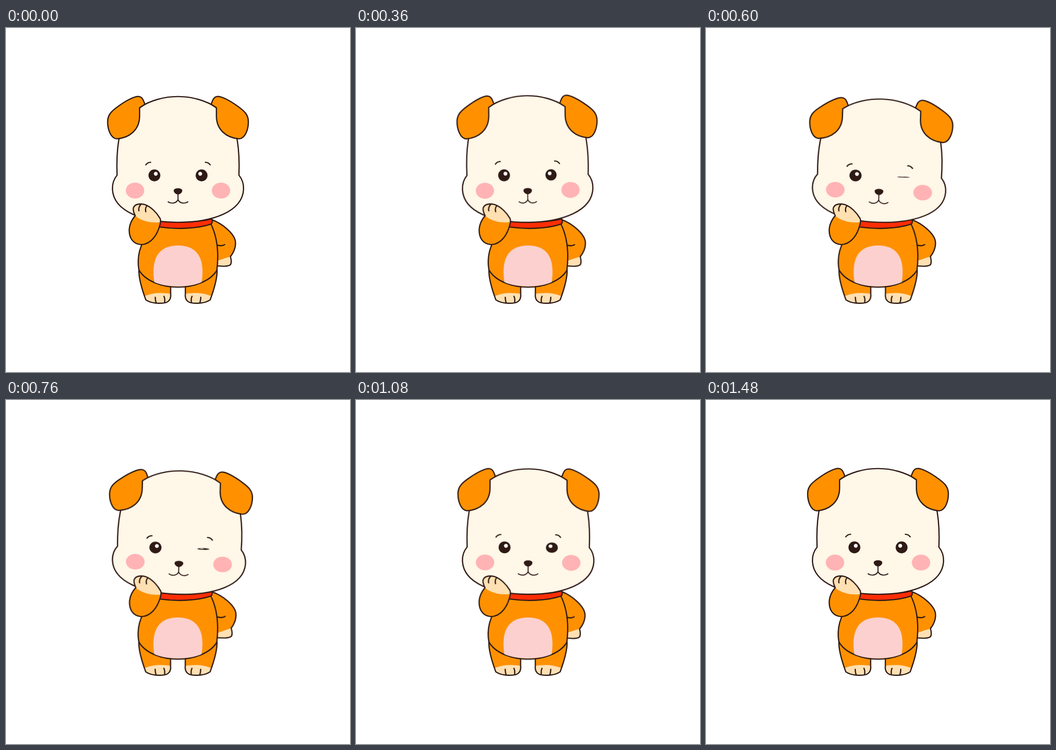
Write an HTML page without scripts that moves like this. It is 748 px wide and 748 px high and loops after 1520 ms.

```html
<!DOCTYPE html>
<html lang="en">
<head>
<meta charset="utf-8">
<title>Winking puppy</title>
<style>
  html, body { margin: 0; width: 100%; height: 100%; overflow: hidden; background: #fff; }
  svg { display: block; width: 100%; height: 100%; }

  .line { fill: none; stroke: #2f1a15; stroke-width: 2.7; stroke-linecap: round; stroke-linejoin: round; }
  .orange { fill: #ff9100; }
  .cream { fill: #fff7e8; }
  .red { fill: #ff2d05; }
  .tip { fill: #ffe0b2; }
  .belly { fill: #fcd0ce; }
  .blush { fill: #ffb3b4; }
  .dark { fill: #2f1a15; }
  .shine { fill: #fff; }

  .move { animation: 1520ms ease-in-out infinite; }
  .head { animation-name: tilt; transform-origin: 374px 419px; }
  .brows { animation-name: brows; }
  .wink { animation-name: wink; transform-origin: 425px 320.5px; }
  .mouth { animation-name: mouth; transform-origin: 374px 374px; }
  .body { animation-name: sway; }
  .paw { animation-name: paw; transform-origin: 293px 470px; }
  .arm { animation-name: arm; transform-origin: 450px 420px; }

  @keyframes tilt {
    0%, 81.6%, 100% { transform: rotate(0deg) scale(1, 1); }
    18.4% { transform: rotate(-.9deg) scale(.992, 1.01); }
    40.8%, 42.1% { transform: rotate(1.95deg) scale(1.017, .98); }
  }
  @keyframes brows {
    0%, 81.6%, 100% { transform: translateY(0); }
    18.4% { transform: translateY(-2px); }
    40.8%, 42.1% { transform: translateY(3px); }
  }
  @keyframes wink {
    0%, 81.6%, 100% { transform: scale(1, 1); }
    18.4% { transform: scale(.94, 1.06); }
    40.8%, 42.1% { transform: scale(1, .07); }
  }
  @keyframes mouth {
    0%, 81.6%, 100% { transform: scaleX(1); }
    13.2%, 23.7% { transform: scaleX(.885); }
    39.5% { transform: scaleX(.93); }
    63.2% { transform: scaleX(.98); }
  }
  @keyframes sway {
    0%, 100% { transform: translateX(0); }
    14.5%, 80% { transform: translateX(-1px); }
    31.6% { transform: translateX(.8px); }
    47.4% { transform: translateX(-.3px); }
    63.2% { transform: translateX(.6px); }
  }
  @keyframes paw {
    0%, 100% { transform: rotate(0deg); }
    14.5%, 47.4%, 80% { transform: rotate(1.4deg); }
    31.6% { transform: rotate(-1.5deg); }
    63.2% { transform: rotate(-2deg); }
  }
  @keyframes arm {
    0%, 100% { transform: rotate(0deg); }
    14.5%, 47.4%, 80% { transform: rotate(-1.5deg); }
    31.6% { transform: rotate(1.7deg); }
    63.2% { transform: rotate(3.7deg); }
  }
</style>
</head>
<body>
<svg viewBox="0 0 748 748">
  <defs>
    <g id="leg">
      <path class="orange" d="M289 525C288 545 297 572 304 591L358 585V545Z"/>
      <path class="tip" d="M301 583C320 575 340 575 358 578C359 587 356 594 348 597C335 600 315 599 304 591Z"/>
      <path class="line" d="M289 525C288 545 297 572 304 591C315 599 335 600 348 597C356 594 359 587 358 578V555M324.500 585.500Q324.500 592 326.500 597.500M343.500 583.500Q346 589 345 595.500"/>
    </g>
    <path id="ear" class="line orange" style="fill:#ff9100" d="M446 166C449 158 451 150 459 149C468 148 486 157 505 171C519 181 527 189 527 204C527 219 521 240 507 241C480 239 457 222 457.500 190L457.500 173.500Z"/>
    <path id="brow" class="line" d="M304 297.500Q308 292 314.500 292"/>
    <ellipse id="blush" class="blush" cx="280.500" cy="353.500" rx="20" ry="17.200"/>
    <g id="eye">
      <circle class="dark" cx="322.700" cy="320.500" r="12.900"/>
      <circle class="shine" cx="325.700" cy="317" r="4.200"/>
    </g>
  </defs>

  <g class="move arm">
    <path class="orange" d="M448 417C470 425 497 447 499 465C500 478 494 490 488 497L450 510Z"/>
    <path class="tip" d="M450 510Q472 505 488 497C490 504 490 510 489 513C487 519 472 519 450 516Z"/>
    <path class="line" d="M448 417C470 425 497 447 499 465C500 478 494 490 488 497C490 504 490 510 489 513C487 519 472 519 450 516M457 471.500Q469 475.500 475.500 471"/>
  </g>

  <g class="move body">
    <use href="#leg"/>
    <use href="#leg" transform="matrix(-1 0 0 1 748 0)"/>
    <path class="line" style="fill:#ff9100" d="M335 425C305 440 287 480 287.500 508C287.500 516 288 522 289.500 527C304 551 340 563.500 374 563.500C408 563.500 444 551 458.500 527C463 490 460 455 445 425Z"/>
    <path class="belly" d="M322.500 552.500C317 515 322 473 374 473C426 473 431 515 425.500 552.500C400 565 348 565 322.500 552.500Z"/>
    <path class="line" style="fill:#ff2d05" d="M330 418C370 425 420 422 447 415Q450 419 447 426C415 437 370 438 332 432.500Z"/>
  </g>

  <g class="move head">
    <path class="line" style="fill:#fff7e8" d="M374 149C405 149 435 158 458 173C485 190 499 220 503 245C507 270 507.500 295 506.500 320C514 329 517 340 516.500 351C514 399 450 422.500 374 422.500C298 422.500 234 399 231.500 351C231 340 234 329 241.500 320C240.500 295 241 270 245 245C249 220 263 190 290 173C313 158 343 149 374 149Z"/>
    <use href="#ear"/>
    <use href="#ear" transform="matrix(-1 0 0 1 748 0)"/>
    <use href="#blush"/>
    <use href="#blush" x="187"/>
    <g class="move brows">
      <use href="#brow"/>
      <use href="#brow" transform="matrix(-1 0 0 1 748 0)"/>
    </g>
    <use href="#eye"/>
    <g class="move wink"><use href="#eye" transform="matrix(-1 0 0 1 748 0)"/></g>
    <path class="dark" d="M364.700 353.500C364.700 346.700 383.300 346.700 383.300 353.500C383.300 358 378 362 374 362C370 362 364.700 358 364.700 353.500Z"/>
    <path class="move mouth line" style="stroke-width:2.200" d="M374 361V373M352.500 378C360 383 371 381 374 373C377 381 388 383 395.500 378"/>
  </g>

  <g class="move paw">
    <path class="orange" d="M281 408C295 420 315 423 336 422C331 451 315 470 294 471C276 470 267 456 268 437C269 425 275 415 281 408Z"/>
    <path class="tip" d="M281 408C278 402 276 396 277 391C280 383 290 381 302 384C316 389 328 402 335 414Q337 418 336 422C315 425 295 420 281 408Z"/>
    <path class="line" d="M281 408C278 402 276 396 277 391C280 383 290 381 302 384C316 389 328 402 335 414C337 418 336 423 335 427C329 451 315 470 294 471C276 470 267 456 268 437C269 425 275 415 281 408ZM293 384Q287.500 390 289 397.500M306 387Q302 392 304 399.500"/>
  </g>
</svg>
</body>
</html>
```
